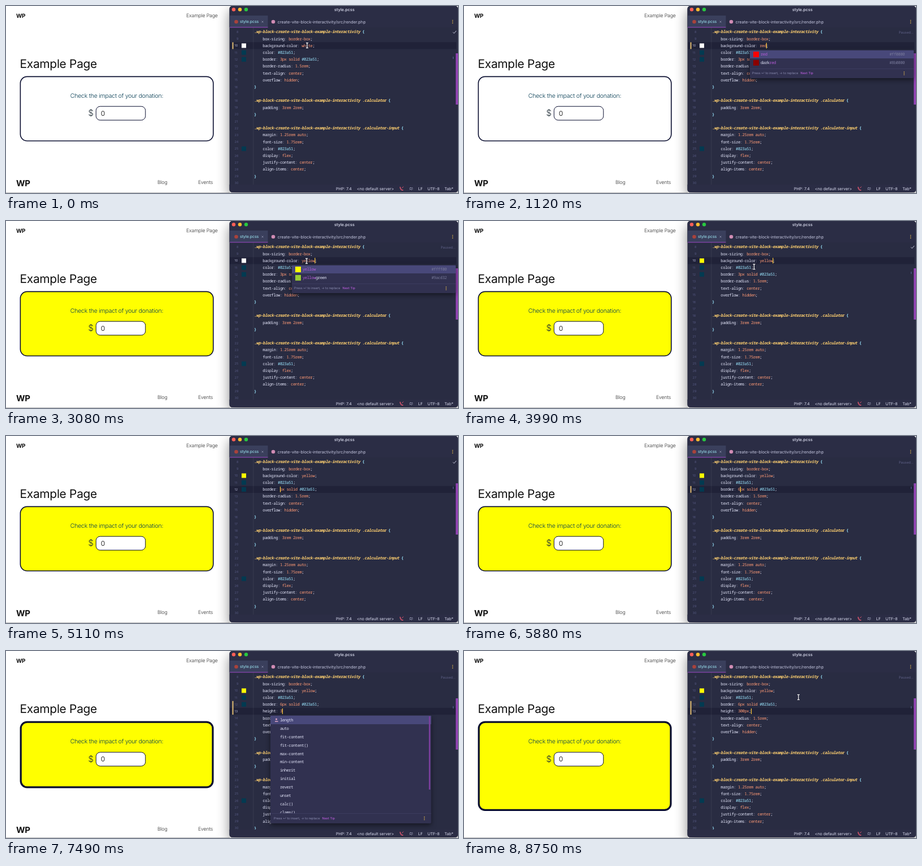
Recreate the animation shown at these times as an HTML page with a canvas. Size 800 by 332 pixels, loop 8.82 s.

```html
<!DOCTYPE html>
<html lang="en">
<head>
<meta charset="utf-8">
<title>Live style editing</title>
<style>
html, body { margin: 0; width: 100%; height: 100%; overflow: hidden; background: #fff; }
canvas { display: block; }
</style>
</head>
<body>
<canvas id="stage" width="800" height="332"></canvas>
<script>
const ctx = document.getElementById('stage').getContext('2d');
const LOOP = 8820, PITCH = 12.2, ADVANCE = 3.83, TOP = 46, INDENT = 454.3;
const SANS = 'Inter, "Open Sans", sans-serif';
const MONO = '"Noto Sans Mono", "DejaVu Sans Mono", monospace';
const C = {
  bg: '#292c42', bar: '#2b2d45', caretRow: '#202238', popup: '#313150', chosen: '#48487a',
  text: '#e4e6fa', dim: '#62648a', gold: '#ffd070', cyan: '#9be6ff', orange: '#ff9a76',
  purple: '#b65cd8', caret: '#ffcb3d', ink: '#023a51', line: '#080c2e', nav: '#333'
};
const HINT = 'Press ↵ to insert, → to replace';
const DOT_HINT = 'Press ^. to choose the selected (or first) suggestion and insert a dot afterwards';
const LENGTHS = ['length', 'auto', 'fit-content', 'fit-content()', 'max-content', 'min-content',
  'inherit', 'initial', 'revert', 'unset', 'calc()', 'clamp()'];

const within = (t, a, b) => t >= a && t < b;
const typed = (s, t, start, step) => s.slice(0, Math.max(0, Math.floor((t - start) / step) + 1));
const ease = p => { p = Math.min(1, Math.max(0, p)); return p * p * (3 - 2 * p); };
const rowY = i => TOP + i * PITCH;

function rect(x, y, w, h, color) {
  ctx.fillStyle = color;
  ctx.fillRect(x, y, w, h);
}
function round(x, y, w, h, r, fill, stroke, width) {
  ctx.beginPath();
  ctx.roundRect(x, y, w, h, r);
  if (fill) { ctx.fillStyle = fill; ctx.fill(); }
  if (stroke) { ctx.strokeStyle = stroke; ctx.lineWidth = width; ctx.stroke(); }
}
function dot(x, y, r, color) {
  ctx.beginPath();
  ctx.arc(x, y, r, 0, 7);
  ctx.fillStyle = color;
  ctx.fill();
}
function path(points, color, width) {
  ctx.beginPath();
  points.forEach(([x, y]) => ctx.lineTo(x, y));
  ctx.strokeStyle = color;
  ctx.lineWidth = width;
  ctx.stroke();
}
function shadow(color, blur, dy) {
  ctx.shadowColor = color;
  ctx.shadowBlur = blur;
  ctx.shadowOffsetY = dy;
}
const noShadow = () => shadow('transparent', 0, 0);

// y is the optical middle of the line
function label(s, x, y, size, color, weight = 400, spacing = 0) {
  ctx.font = `${weight} ${size}px ${SANS}`;
  ctx.letterSpacing = spacing + 'px';
  ctx.fillStyle = color;
  ctx.fillText(s, x, y + size * .35);
  return x + ctx.measureText(s).width;
}
function code(s, x, y, color, style = '500') {
  ctx.font = `${style} 7.2px ${MONO}`;
  ctx.letterSpacing = '0px';
  ctx.letterSpacing = ADVANCE - ctx.measureText('0').width + 'px';
  ctx.fillStyle = color;
  ctx.fillText(s, x, y + 2.4);
  return x + s.length * ADVANCE;
}
function codeLine(s, y) {
  if (s[0] === '.') {
    code('{', code(s + ' ', 439, y, C.gold, 'italic 600'), y, C.cyan, '600');
  } else if (s === '}') {
    code(s, 439, y, C.cyan, '600');
  } else if (s) {
    const [name, value] = s.split(':');
    let x = code(name, INDENT, y, C.text);
    if (value === undefined) return;
    x = code(':', x, y, '#9294b8');
    for (const part of value.match(/[^ ;]+|[ ;]/g) || [])
      x = code(part, x, y, part[0] === '#' ? C.cyan : part === ';' ? C.text : C.orange);
  }
}
function kebab(x, y) {
  for (const d of [-2.5, 0, 2.5]) dot(x, y + d, .8, '#e5b94e');
}
function ibeam(x, y) {
  for (const [color, w] of [['#15162a', 2.6], ['#fff', 1.3]]) {
    path([[x, y - 4], [x, y + 4]], color, w);
    path([[x - 2, y - 4.5], [x + 2, y - 4.5]], color, w);
    path([[x - 2, y + 4.5], [x + 2, y + 4.5]], color, w);
  }
}

function stateAt(t) {
  const s = { color: 'white', caret: null, selection: null, row: 2, border: '3px', height: null };
  if (t >= 500) s.color = typed('red', t, 500, 110);
  if (t >= 1900) s.color = typed('yellow', t, 1900, 120);
  if (t >= 4400) s.row = 4;
  if (t >= 5000) s.border = t < 5300 ? 'px' : '6px';
  if (t >= 6500) {
    s.row = 5;
    s.height = t < 7450 ? typed('height: ', t, 6800, 75) : 'height: ' + typed('300px;', t, 7450, 110);
  }
  const valueX = INDENT + 18 * ADVANCE;
  if (within(t, 250, 500)) s.selection = [valueX, 5];
  if (within(t, 1600, 1900)) s.selection = [valueX, 3];
  if (within(t, 4650, 5000)) s.selection = [INDENT + 8 * ADVANCE, 1];
  if (s.row === 2) s.caret = t < 250 ? null : valueX + s.color.length * ADVANCE;
  else if (s.row === 4) s.caret = INDENT + (t < 5300 ? 8 : 9) * ADVANCE;
  else s.caret = INDENT + s.height.length * ADVANCE;

  s.paused = within(t, 500, 1400) || within(t, 1900, 3300) || within(t, 5300, 5900) || t >= 6500;
  s.swatch = t < 3300 ? '#fff' : '#ff0';
  s.fill = t < 1300 ? '#fff' : t < 2850 ? '#f00' : '#ff0';
  s.thick = t < 5900 ? 1.6 : 3.2;
  s.bottom = t < 5900 ? 240.3 : t < 8400 ? 243.5 : 284;
  if (t < 400) s.mouse = [533, 70];
  else if (within(t, 2950, 4700)) {
    const p = ease((t - 3700) / 650);
    s.mouse = [532 - 44 * p, 71 + 24 * p];
  } else if (t >= 8450) {
    const p = ease((t - 8450) / 230);
    s.mouse = [510 + 82 * p, 95 - 13 * p];
  }
  return s;
}

function drawPage(s) {
  rect(0, 0, 800, 332, '#fff');
  label('WP', 18, 17, 10, '#111', 700, -.4);
  label('Example Page', 319, 17, 8.8, C.nav, 300, -.2);
  label('Example Page', 24.5, 103, 21, '#111', 400, -.35);

  const w = s.thick;
  round(24.6 + w / 2, 124.6 + w / 2, 343 - w, s.bottom - 124.6 - w, 12.7 - w / 2, s.fill, C.line, w);
  const y = w - 1.6;
  label('Check the impact of your donation:', 113.7, 159.2 + y, 10.5, C.ink, 300, -.2);
  label('$', 145.5, 190 + y, 15, '#1c2a33', 300);
  round(159.3, 178.2 + y, 87.5, 24.5, 7.5, '#fff', C.line, 1);
  label('0', 167.8, 190.5 + y, 12, '#333', 400);

  // the footer is pushed down by the card
  const drop = s.bottom - 240.3;
  label('WP', 18, 315 + drop, 15, '#111', 700, -.4);
  label('Blog', 268, 312.5 + drop, 8.8, C.nav, 300, -.2);
  label('Events', 340, 312.5 + drop, 8.8, C.nav, 300, -.2);
  rect(0, 331, 396, 1, '#b5b5b8');
}

function drawWindow() {
  shadow('rgba(0,0,0,.45)', 22, 8);
  round(395.5, 0, 404.5, 331, 5, C.bg);
  noShadow();
  round(395.5, 0, 404.5, 38, [5, 5, 0, 0], C.bar);
  ['#ff5f57', '#febc2e', '#28c840'].forEach((c, i) => dot(403 + 11 * i, 6.2, 3.2, c));
  label('style.pcss', 581, 6.3, 7.2, '#d0d2e4', 600);
  rect(396, 17, 67.5, 21, '#3a3f5c');
  rect(396, 37.2, 67.5, 1.2, '#8d46b2');
  dot(407.5, 28, 3.3, '#a8433c');
  label('style.pcss', 414, 28, 7, '#93d6e4', 500, -.1);
  path([[452.5, 26.5], [455.5, 29.5]], '#9a9bb8', .7);
  path([[455.5, 26.5], [452.5, 29.5]], '#9a9bb8', .7);
  dot(473, 28, 3.3, '#d08cb4');
  label('create-vite-block-interactivity/src/render.php', 480.5, 28, 7.3, '#c6c8e0');
  kebab(790.5, 28);
}

function drawStatus() {
  round(395.5, 317, 404.5, 14, [0, 0, 5, 5], C.bar);
  const items = [['PHP: 7.4', 584], ['<no default server>', 621], ['LF', 729.5], ['UTF-8', 746], ['Tab*', 776]];
  for (const [s, x] of items) label(s, x, 324.2, 7, '#dcdef2');
  path([[697.5, 321], [698, 324], [700, 326.5], [703, 327]], '#e0566f', 1.5);
  path([[700.5, 323.5], [703.5, 320.8]], '#e0566f', 1);
  path([[714, 324], [716, 322], [718, 323.5], [720, 322.5]], '#a9abc6', .9);
  path([[714, 326], [716, 325], [718, 326.5], [720, 324.5]], '#a9abc6', .9);
}

function drawCode(s, t) {
  const lines = [
    '.wp-block-create-vite-block-example-interactivity', 'box-sizing: border-box;',
    `background-color: ${s.color};`, 'color: #023a51;', `border: ${s.border} solid #023a51;`,
    'border-radius: 1.5rem;', 'text-align: center;', 'overflow: hidden;', '}', '',
    '.wp-block-create-vite-block-example-interactivity .calculator', 'padding: 3rem 2rem;', '}', '',
    '.wp-block-create-vite-block-example-interactivity .calculator-input', 'margin: 1.25rem auto;',
    'font-size: 1.75rem;', 'color: #023a51;', 'display: flex;', 'justify-content: center;',
    'align-items: center;', '}', ''
  ];
  if (s.height !== null) lines.splice(5, 0, s.height);
  rect(396, rowY(s.row) - 6.1, 401, PITCH, C.caretRow);
  rect(437.5, 38, .7, 279, 'rgba(255,255,255,.1)');
  if (s.selection) rect(s.selection[0], rowY(s.row) - 6, s.selection[1] * ADVANCE, 12, '#5a4b8c');
  lines.slice(0, 23).forEach((line, i) => {
    const y = rowY(i), n = String(i + 8);
    label(n, 411.5 - n.length * 3.5, y, 5.6, i === s.row ? '#b0b2d0' : '#555880');
    const isColor = /^(color|border|background-color):/.test(line);
    if (isColor) rect(417, y - 4, 8, 8, i === 2 ? s.swatch : C.ink);
    codeLine(line, y);
  });
  const change = '#e3bd72';
  if (t < 3000) rect(400.5, rowY(2) - 6, 2, 12, change);
  if (t >= 5300) rect(400.5, rowY(4) - 6, 2, t < 6500 ? 12 : 24.2, change);
  if (s.caret && !s.selection) rect(s.caret, rowY(s.row) - 5, 1.2, 10, C.caret);
  if (s.paused) label('Paused...', 769.5, 46.5, 6, '#5f6187');
  else path([[791, 46.5], [793, 48.5], [797, 44]], '#c9cbe0', 1);
  rect(791, s.height === null ? 90 : 98, 1, 4, '#57639a');
  rect(796, 84, 4, 91, '#8f43b0');
}

function popupBox(x, y, w, h) {
  shadow('rgba(0,0,0,.5)', 8, 3);
  round(x, y, w, h, 2, C.popup);
  noShadow();
}
function tip(s, x, y) {
  label('Next Tip', label(s, x, y, 5.6, '#8b8db0') + 4, y, 5.6, C.purple, 500);
}
function colorPopup(items, match, hint) {
  popupBox(506, 78, 290, 50);
  rect(506, 79, 290, 14, C.chosen);
  rect(506, 111, 290, .6, '#41416a');
  items.forEach(([name, hex], i) => {
    const y = 86 + 14.8 * i, at = Math.max(0, name.indexOf(match));
    rect(512, y - 5, 10, 10, hex);
    let x = code(name.slice(0, at), 525, y, C.text);
    x = code(match, x, y, C.purple);
    code(name.slice(at + match.length), x, y, C.text);
    code(hex, 753, y, '#777999');
  });
  tip(hint, 510, 119.5);
  kebab(779, 119.5);
}
function lengthPopup() {
  popupBox(468, 114, 284.5, 192);
  rect(468, 115, 284.5, 15, C.chosen);
  ctx.save();
  ctx.beginPath();
  ctx.rect(468, 114, 284, 174);
  ctx.clip();
  LENGTHS.forEach((name, i) => code(name, 485, 122.5 + 14.9 * i, C.text));
  ctx.restore();
  dot(478.5, 121, 1.6, '#d9a3c4');
  path([[476, 125], [481.5, 125]], '#d9a3c4', 1.6);
  rect(468, 288, 284.5, .6, '#41416a');
  rect(748.5, 116, 2.5, 130, '#7c3f9e');
  tip(HINT, 474, 297);
  kebab(740.5, 297);
}

function draw(t) {
  const s = stateAt(t);
  drawPage(s);
  drawWindow();
  drawCode(s, t);
  drawStatus();
  if (within(t, 560, 1250))
    colorPopup([['red', '#ff0000'], ['darkred', '#8b0000']], s.color, HINT);
  if (within(t, 1960, 3300))
    colorPopup([['yellow', '#ffff00'], ['yellowgreen', '#9acd32']], s.color, t < 2550 ? DOT_HINT : HINT);
  if (within(t, 7380, 7560)) lengthPopup();
  if (s.mouse) ibeam(...s.mouse);
}

ctx.textRendering = 'geometricPrecision';
const start = performance.now();
function tick() {
  draw((performance.now() - start) % LOOP);
  requestAnimationFrame(tick);
}
tick();
</script>
</body>
</html>
```
